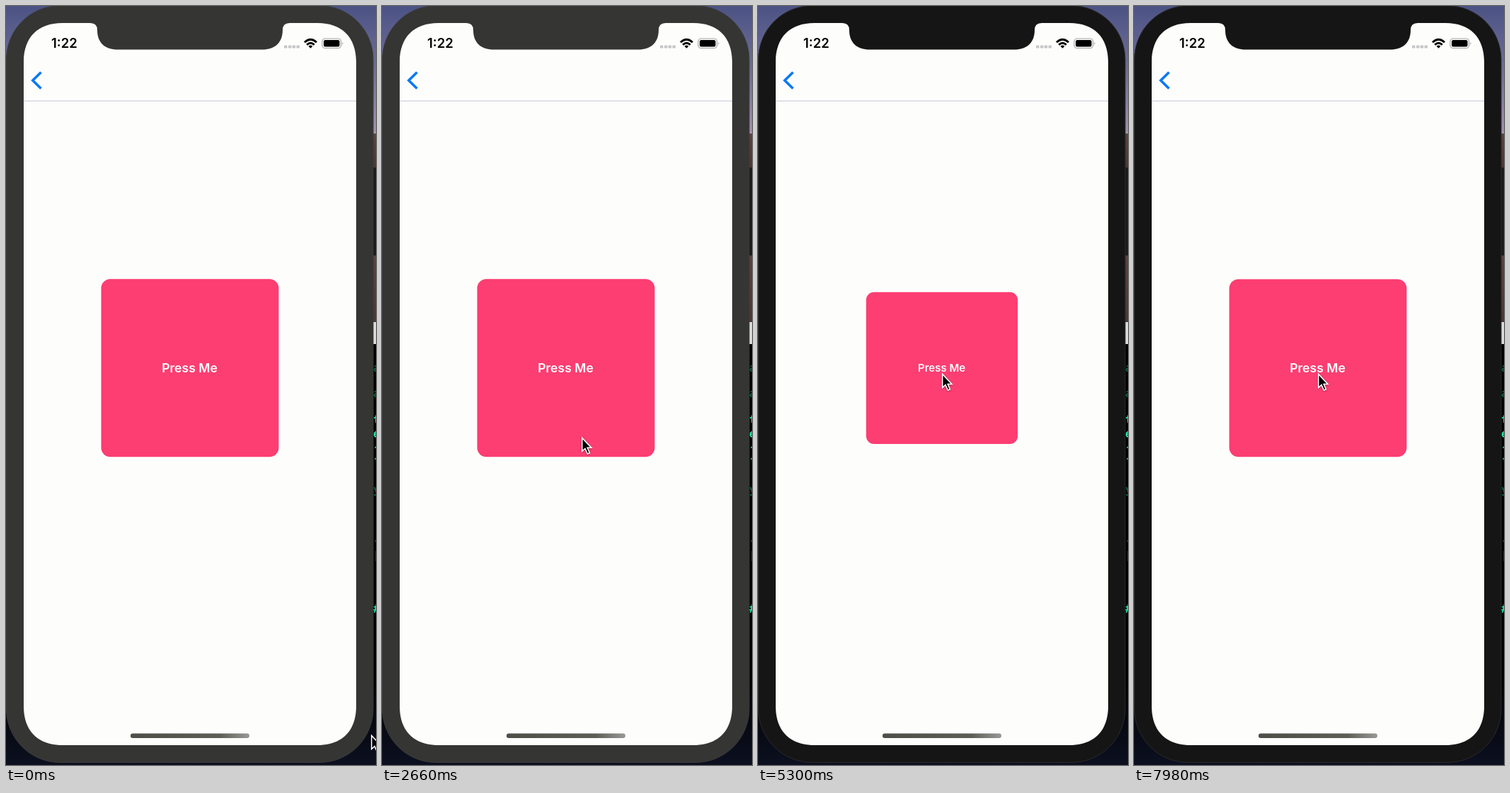
These frames come from a looping animation (523 by 1071 pixels, 8000 ms). An HTML page:

```html
<!DOCTYPE html>
<html lang="en">
<head>
<meta charset="utf-8">
<title>Press Me</title>
<style>
  html, body { margin: 0; width: 100%; height: 100%; overflow: hidden; background: #000; }
  svg { display: block; width: 523px; height: 1071px; }
  text { font-family: Inter, Roboto, sans-serif; font-weight: 600; }
  .code text { font: bold 16px "DejaVu Sans Mono", monospace; }
</style>
</head>
<body>
<svg viewBox="0 0 523 1071">
  <defs>
    <linearGradient id="sky" x2="0" y2="1">
      <stop stop-color="#4b5384"/>
      <stop offset=".55" stop-color="#74719a"/>
      <stop offset="1" stop-color="#a491ae"/>
    </linearGradient>
    <linearGradient id="ground" x2="0" y2="1">
      <stop stop-color="#5c4140"/>
      <stop offset="1" stop-color="#4a3832"/>
    </linearGradient>
    <linearGradient id="night" x2="0" y2="1">
      <stop stop-color="#000"/>
      <stop offset="1" stop-color="#0c1020"/>
    </linearGradient>
    <linearGradient id="bar">
      <stop stop-color="#4c4e48"/>
      <stop offset=".75" stop-color="#5c5e58"/>
      <stop offset="1" stop-color="#989994"/>
    </linearGradient>
  </defs>

  <!-- desktop behind the phone -->
  <rect width="523" height="1071"/>
  <rect width="523" height="180" fill="url(#sky)"/>
  <rect y="150" width="260" height="240" fill="#16160f"/>
  <rect x="260" y="180" width="263" height="48" fill="url(#ground)"/>
  <rect x="260" y="228" width="263" height="124" fill="#191b1c"/>
  <rect x="260" y="352" width="263" height="94" fill="url(#ground)"/>
  <rect x="260" y="446" width="263" height="31" fill="#dcdcdc"/>
  <rect y="940" width="523" height="131" fill="url(#night)"/>
  <g class="code" id="code"></g>

  <!-- phone -->
  <rect id="bezel" x="0.5" y="-0.5" width="518.5" height="1068" rx="76"/>
  <path fill="#fdfdfc" d="M80 24H119Q129 24 129 34C129 52 140 61.500 158 61.500H362
    C380 61.500 391 52 391 34Q391 24 401 24H440C475 24 495 44 495 79V988
    C495 1023 475 1043 440 1043H80C45 1043 25 1023 25 988V79C25 44 45 24 80 24Z"/>
  <text x="64" y="59" font-size="18.500">1:22</text>
  <g fill="#c6c6c8">
    <rect x="393" y="55.500" width="4.500" height="4" rx="1"/>
    <rect x="399" y="55.500" width="4.500" height="4" rx="1"/>
    <rect x="404.700" y="55.500" width="4.500" height="4" rx="1"/>
    <rect x="410.500" y="55.500" width="4.500" height="4" rx="1"/>
  </g>
  <g fill="none" stroke="#000" stroke-width="2.800">
    <path d="M422 51.300Q430.500 43.300 439 51.300M425.200 54.700Q430.500 49.700 435.800 54.700"/>
    <path d="M427.600 56.800Q430.500 54.300 433.400 56.800L430.500 59.800Z" fill="#000" stroke="none"/>
  </g>
  <rect x="447" y="46" width="26.500" height="13.500" rx="4" fill="none" stroke="#a3a3a3" stroke-width="1.200"/>
  <rect x="449" y="48" width="22.500" height="9.500" rx="2.300"/>
  <path d="M475.500 50.500Q477.300 52.700 475.500 55Z" fill="#8e8e8e"/>
  <path d="M49.500 93.500L37.800 105L49.500 116.500" fill="none" stroke="#0a78f5" stroke-width="3.600"/>
  <rect x="25" y="133.500" width="470" height="1" fill="#c4c4d6"/>
  <rect x="176" y="1026.500" width="168" height="6.500" rx="3.200" fill="url(#bar)"/>

  <g id="button">
    <rect x="-125.500" y="-125.500" width="251" height="251" rx="13" fill="#fc3e72"/>
    <text x="-0.500" y="6" font-size="17.600" fill="#fff" text-anchor="middle">Press Me</text>
  </g>

  <path id="cursor" stroke="#fff" stroke-width="1.500" style="filter:drop-shadow(0 1px 1px #0005)"
    d="M.7 1.500V20.500L5 16.600L8.400 24.200L11.400 22.900L8.200 15.500H14Z"/>
</svg>

<script>
const LOOP = 8000;
const PRESS = 110.5, RELEASE = 153.4, ACTIVATE = 111;
const SPRING_FREQ = Math.PI / 7.3, SPRING_DECAY = SPRING_FREQ * 0.62;

// Cursor moves: start tick, end tick, destination
const START = [516, 1028];
const MOVES = [[4, 36, [303, 681]], [42, 72, [265, 548]], [76, 102, [260, 518]]];

const $ = id => document.getElementById(id);
const bezel = $("bezel"), button = $("button"), cursor = $("cursor");

const LETTERS = [
  ["a", 516, "#0c5a3c"], ["a", 552, "#0c5a3c"], ["t", 589, "#1ee6a4"],
  ["e", 609, "#1ee6a4"], ["-", 627, "#18b985"], ["-", 643, "#18b985"],
  ["y", 688, "#0c5a3c"], ["-", 759, "#0b4a34"], ["[", 781, "#0b4a34"],
  ["#", 856, "#1ee6a4"]
];
$("code").innerHTML =
  LETTERS.map(([letter, y, color]) => `<text x="519" y="${y}" fill="${color}">${letter}</text>`).join("") +
  [677, 712, 793, 849, 906, 926].map(y => `<rect y="${y}" width="1.500" height="9" fill="#128a62"/>`).join("");

// Ticks are equal steps of movement, shown for 20, 20 and 100 ms in turn.
function tickAt(ms) {
  const shifted = ms + 20, phase = shifted % 140;
  return 3 * Math.floor(shifted / 140) + (phase < 20 ? 0 : phase < 40 ? 1 : 2);
}

function spring(ticks) {
  if (ticks <= 0) return 0;
  const angle = SPRING_FREQ * ticks;
  return 1 - Math.exp(-SPRING_DECAY * ticks) *
    (Math.cos(angle) + SPRING_DECAY / SPRING_FREQ * Math.sin(angle));
}

function cursorAt(tick) {
  let position = START;
  for (const [from, to, target] of MOVES) {
    const p = Math.min(1, Math.max(0, (tick - from) / (to - from)));
    const eased = p * p * (3 - 2 * p);
    position = position.map((v, axis) => v + (target[axis] - v) * eased);
  }
  return position;
}

function render(now) {
  const tick = tickAt(now % LOOP);
  const scale = 1 - 0.2 * spring(tick - PRESS) + 0.2 * spring(tick - RELEASE);
  const active = tick >= ACTIVATE;
  bezel.setAttribute("fill", active ? "#151515" : "#353533");
  bezel.setAttribute("stroke", active ? "#2b2b2d" : "#3b3b3b");
  button.setAttribute("transform", `translate(260 510.800) scale(${scale})`);
  cursor.setAttribute("transform", `translate(${cursorAt(tick)})`);
}

const started = performance.now();
function frame() {
  render(performance.now() - started);
  requestAnimationFrame(frame);
}
frame();
</script>
</body>
</html>
```
